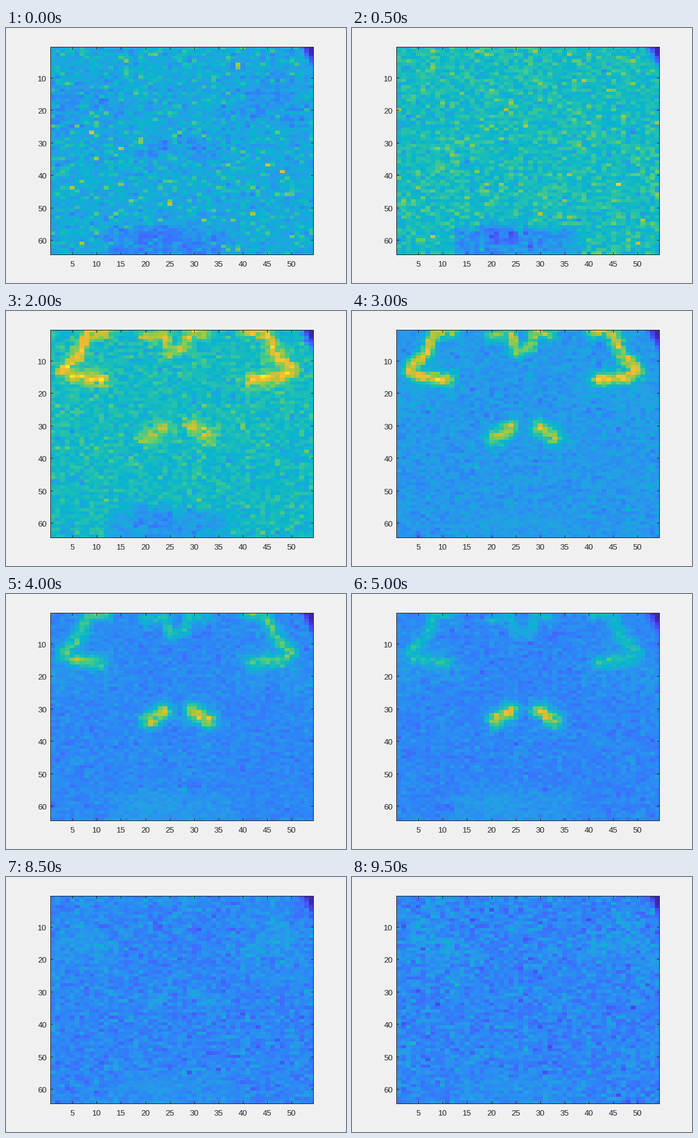
Write a matplotlib script that moves like this. It is 560x420 px and loops after 10 s.

```python
import numpy as np
import matplotlib.pyplot as plt
from matplotlib.animation import FuncAnimation
from matplotlib.colors import LinearSegmentedColormap

W, H, DPI = 560, 420, 100
FRAMES, STEP = 20, 500
COLS, ROWS = 54, 64
LEFT, TOP, RIGHT, BOTTOM = 73.2, 31.2, 506.3, 373.3  # axes box in pixels
INK = "#262626"

PARULA = ["#3e26a8", "#4746eb", "#4367fd", "#2d87f7", "#25a0e5", "#08b5d0",
          "#24c1ae", "#57cc79", "#abc739", "#efba35", "#fdc831", "#f9fb15"]
cmap = LinearSegmentedColormap.from_list("parula", PARULA)

col, row = np.meshgrid(np.arange(1, COLS + 1), np.arange(1, ROWS + 1))
ASPECT = 0.665  # cell height over cell width


def stroke(points, width):
    """Soft line through (col, row) points, 1 on the line and fading outward."""
    best = np.full(col.shape, np.inf)
    for (x0, y0), (x1, y1) in zip(points, points[1:]):
        dx, dy = x1 - x0, (y1 - y0) * ASPECT
        px, py = col - x0, (row - y0) * ASPECT
        t = np.clip((px * dx + py * dy) / (dx * dx + dy * dy), 0, 1)
        best = np.minimum(best, np.hypot(px - t * dx, py - t * dy))
    return np.exp(-(best / width) ** 2)


def pair(points, width, mirror_sum):
    """The same stroke on the left and mirrored on the right."""
    mirrored = [(mirror_sum - x, y) for x, y in points]
    return np.maximum(stroke(points, width), stroke(mirrored, width))


def rise(x):
    return 1 / (1 + np.exp(-x))


hooks = pair([(12, 1), (8.5, 1), (6.5, 8), (3, 13), (5, 15), (11, 16)], 1.4, 53)
arch = stroke([(20, 2.5), (24, 2), (25, 7.5), (28, 6), (29, 1), (32, 2)], 1.2)
top = np.maximum(hooks, .8 * arch)
spots = pair([(20.6, 33.8), (23.8, 30.8)], 1.7, 53.5)
slab = rise((col - 12.4) * 3) * rise((row - 56.3) * 2) * rise((37.5 - col) / 1.2)
bottom = np.maximum(.65 * slab, stroke([(19.5, 59), (24.5, 60)], 3))
haze = pair([(2, 22), (7, 14), (11, 18)], 4, 53)
corner = np.clip(((COLS - col) + .4 * (row - 1) - .7) / 2.1, 0, 1)


def bell(t, centre, width):
    return np.exp(-((t - centre) / width) ** 2)


def fade(t, life):
    return np.exp(-max(t, 0) / life)


def ease(x):
    x = np.clip(x, 0, 1)
    return x * x * (3 - 2 * x)


def field(frame):
    t = frame * STEP / 1000
    rng = np.random.default_rng(100 + frame)
    flash, grown = bell(t, 1.2, 1.42), ease(t / 3)

    signal = (.44 * grown * fade(t - 3, 2.6) * top
              + (.50 * bell(t, 4.4, 2.9) - .17 * fade(t, 1)) * spots
              + (.10 * grown * fade(t - 3, 9) - .39 * flash) * bottom
              + (.045 - .12 * fade(t, 1)) * haze)
    signal = signal * (1 + .15 * rng.standard_normal(col.shape))

    spread = .03 + .035 * flash + .025 * (t / 9.5) ** 3
    noise = spread * (1 - .5 * bottom) * rng.standard_normal(col.shape)
    specks = (.008 + .045 * fade(t, 1)) * (rng.exponential(size=col.shape) - 1)
    return np.clip((.275 + .30 * flash + signal + noise + specks) * corner, 0, 1)


fig = plt.figure(figsize=(W / DPI, H / DPI), dpi=DPI, facecolor="#f0f0f0")
ax = fig.add_axes([LEFT / W, 1 - BOTTOM / H,
                   (RIGHT - LEFT) / W, (BOTTOM - TOP) / H])
image = ax.imshow(field(0), cmap=cmap, vmin=0, vmax=1, aspect="auto",
                  interpolation="nearest",
                  extent=(.5, COLS + .5, ROWS + .5, .5))
xticks, yticks = range(5, 51, 5), range(10, 61, 10)
ax.set_xticks(xticks)
ax.set_yticks(yticks)
ax.tick_params(direction="in", top=True, right=True, length=3.1, width=.72,
               color=INK, labelbottom=False, labelleft=False)
for spine in ax.spines.values():
    spine.set(linewidth=.72, color=INK)


def label(x, y, value, align):
    fig.text(x / W, 1 - y / H, str(value), ha=align, va="baseline",
             family="Liberation Sans", size=9.6, color=INK)


for v in xticks:
    label(LEFT + (v - .5) * (RIGHT - LEFT) / COLS, 393, v, "center")
for v in yticks:
    label(67.3, TOP + (v - .5) * (BOTTOM - TOP) / ROWS + 5.8, v, "right")


def update(frame):
    image.set_data(field(frame))
    return [image]


anim = FuncAnimation(fig, update, frames=FRAMES, interval=STEP, repeat=True,
                     repeat_delay=0)
plt.show()
```
